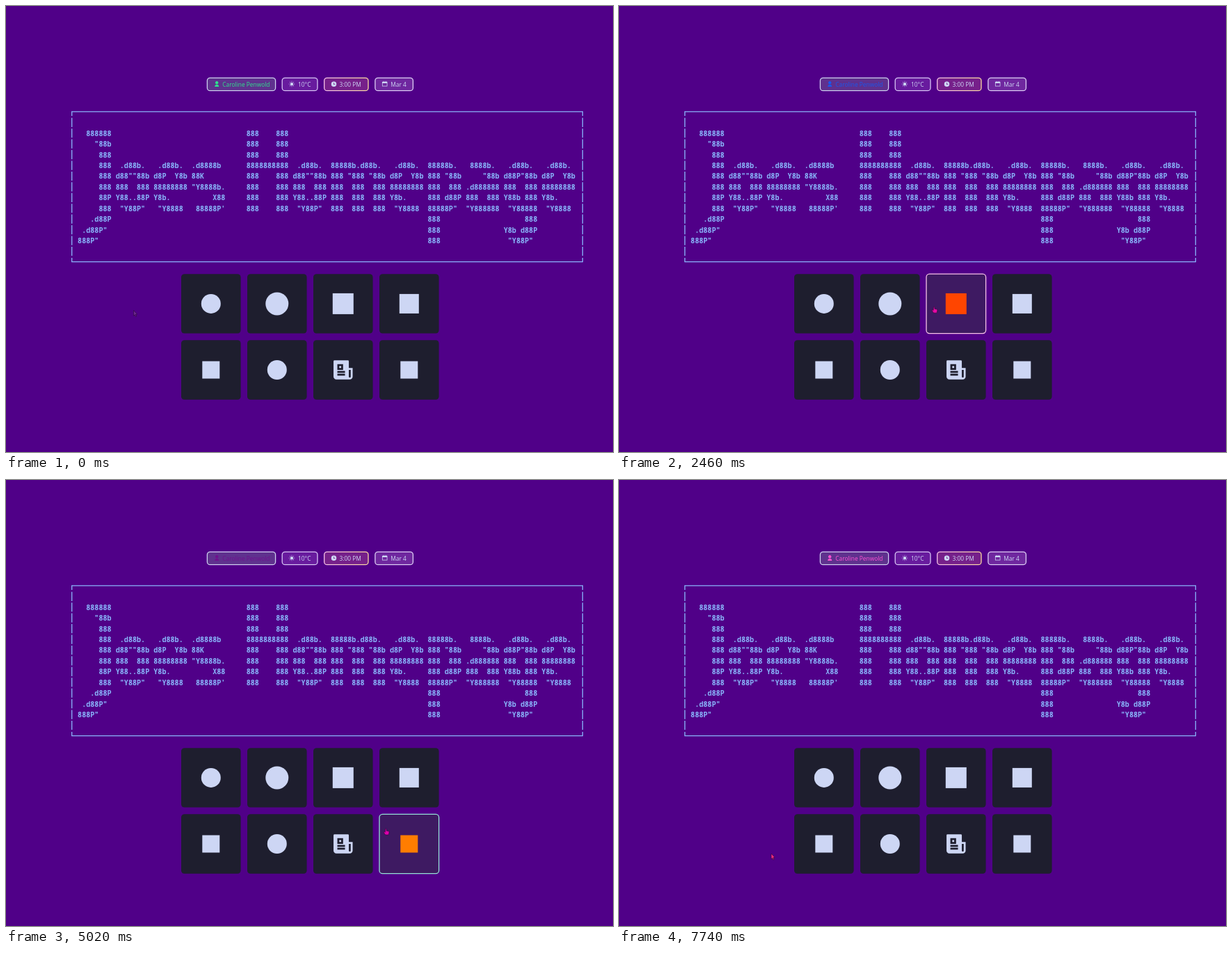
An HTML page for the animation above (7.77 s loop, 873 by 641 pixels).

```html
<!DOCTYPE html>
<html lang="en">
<head>
<meta charset="utf-8">
<title>Start page</title>
<style>
  html, body { margin: 0; width: 100%; height: 100%; overflow: hidden; background: #500088; }
  svg { display: block; width: 873px; height: 641px; }
  .banner { font: 700 10.117px "Noto Sans Mono", "DejaVu Sans Mono", monospace; fill: #89b4fa; white-space: pre; }
  .frame { fill: none; stroke: #89b4fa; stroke-width: 1.3; }
  .badge { font: 8.4px "Open Sans", "Noto Sans", sans-serif; fill: #cdd6f4; }
  .badge rect { stroke-width: 1.3; }
</style>
</head>
<body>
<svg id="stage" viewBox="0 0 873 641">
  <defs>
    <linearGradient id="warm"><stop offset="0" stop-color="#f5c2e7"/><stop offset="1" stop-color="#f9d99f"/></linearGradient>
  </defs>
  <rect width="873" height="641" fill="#500088"/>
</svg>
<script>
const LOOP = 7770;
const stage = document.getElementById('stage');

function add(parent, tag, attrs, text) {
  const el = document.createElementNS('http://www.w3.org/2000/svg', tag);
  for (const key in attrs) el.setAttribute(key, attrs[key]);
  if (text) el.textContent = text;
  parent.appendChild(el);
  return el;
}

// Status badges
const icons = {
  user: 'M4 22a8 8 0 1 1 16 0H4zm8-9c-3.3 0-6-2.7-6-6s2.7-6 6-6 6 2.7 6 6-2.7 6-6 6z',
  sun: 'M12 18a6 6 0 1 1 0-12 6 6 0 0 1 0 12zM11 1h2v3h-2zM11 20h2v3h-2zM3.5 4.9l1.4-1.4L7 5.6 5.6 7zM17 18.4l1.4-1.4 2.1 2.1-1.4 1.4zM19.1 3.5l1.4 1.4L18.4 7 17 5.6zM5.6 17L7 18.4l-2.1 2.1-1.4-1.4zM23 11v2h-3v-2zM4 11v2H1v-2z',
  clock: 'M12 22a10 10 0 1 1 0-20 10 10 0 0 1 0 20zm1-10V7h-2v7h6v-2z',
  date: 'M17 3h4a1 1 0 0 1 1 1v16a1 1 0 0 1-1 1H3a1 1 0 0 1-1-1V4a1 1 0 0 1 1-1h4V1h2v2h6V1h2v2zm3 6H4v10h16V9z',
  news: 'M19 22H5a3 3 0 0 1-3-3V3a1 1 0 0 1 1-1h14a1 1 0 0 1 1 1v7h4v9a3 3 0 0 1-3 3zm-1-10v7a1 1 0 0 0 2 0v-7h-2zM6 6v6h6V6H6zm0 7v2h8v-2H6zm0 3v2h8v-2H6zm2-8h2v2H8V8z'
};

function addIcon(parent, name, x, y, size) {
  return add(parent, 'path', {
    d: icons[name], 'fill-rule': 'evenodd',
    transform: `translate(${x} ${y}) scale(${size / 24})`
  });
}

function addBadge(x, right, icon, textX, text, fill, stroke) {
  const g = add(stage, 'g', { class: 'badge' });
  add(g, 'rect', { x, y: 103.3, width: right - x, height: 18.4, rx: 4, fill, stroke });
  addIcon(g, icon, x + 9.3, 107.7, 9);
  add(g, 'text', { x: textX, y: 116 }, text);
  return g;
}

const nameBadge = addBadge(289.4, 387.6, 'user', 311.3, 'Caroline Penwold', '#5f318e', '#cdd0ee');
addBadge(397.2, 448, 'sun', 420, '10°C', '#681b9e', '#d6c4f4');
addBadge(457.7, 521, 'clock', 479.4, '3:00 PM', '#76208a', 'url(#warm)');
addBadge(530.9, 585.4, 'date', 553.2, 'Mar 4', '#6f279f', '#dccdf4');

// Banner lettering, one entry per glyph; short ones start at row 3
const low = rows => ['', '', '', ...rows];
const glyphs = {
  J: ['  888888', '    "88b', '     888', '     888', '     888', '     888', '     88P', '     888', '   .d88P', ' .d88P"', '888P"'],
  H: [0, 1, 2, 3, 4, 5, 6, 7].map(r => r === 3 ? '8888888888' : '888    888'),
  o: low([' .d88b.', 'd88""88b', '888  888', 'Y88..88P', ' "Y88P"']),
  e: low([' .d88b.', 'd8P  Y8b', '88888888', 'Y8b.', ' "Y8888']),
  s: low(['.d8888b', '88K', '"Y8888b.', '     X88', " 88888P'"]),
  m: low(['88888b.d88b.', '888 "888 "88b', '888  888  888', '888  888  888', '888  888  888']),
  p: low(['88888b.', '888 "88b', '888  888', '888 d88P', '88888P"', '888', '888', '888']),
  a: low([' 8888b.', '    "88b', '.d888888', '888  888', '"Y888888']),
  g: low([' .d88b.', 'd88P"88b', '888  888', 'Y88b 888', ' "Y88888', '     888', 'Y8b d88P', ' "Y88P"'])
};
const word = [['J', 0], ['o', 9], ['e', 18], ['s', 27], ['H', 40], ['o', 51], ['m', 60],
  ['e', 74], ['p', 83], ['a', 92], ['g', 101], ['e', 110]];
const rowH = 15.43;

for (let r = 0; r < 11; r++) {
  let line = '';
  for (const [ch, col] of word) {
    const part = glyphs[ch][r];
    if (part) line = line.padEnd(col) + part;
  }
  add(stage, 'text', { class: 'banner', x: 103.1, y: 186.7 + r * rowH }, line);
}

// Banner frame, its sides broken at each row
let sides = 'M94.7 158V151.9H829.3V158M94.7 362V367.6H829.3V362';
for (let r = 1; r < 14; r++) {
  const y = 151.9 + r * rowH - 6.6;
  sides += `M94.7 ${y}v13.2M829.3 ${y}v13.2`;
}
add(stage, 'path', { class: 'frame', d: sides });

// Link tiles: shape, size, hover border
const tiles = [
  ['circle', 28, '#f5e0dc'], ['circle', 33, '#f2cdcd'], ['square', 30, '#f5c2e7'], ['square', 28, '#cba6f7'],
  ['square', 25, '#f38ba8'], ['circle', 28, '#f38ba8'], ['news', 33, '#fab387'], ['square', 25, '#94e2d5']
].map(([shape, size, border], i) => {
  const x = 252 + (i % 4) * 95, y = i < 4 ? 385.2 : 480.3;
  const cx = x + 42.8, cy = y + 42.7;
  const box = add(stage, 'rect', { x, y, width: 85.6, height: 85.4, rx: 4.5, 'stroke-width': 1.3 });
  let mark;
  if (shape === 'circle') mark = add(stage, 'circle', { cx, cy, r: size / 2 });
  else if (shape === 'square') mark = add(stage, 'rect', { x: cx - size / 2, y: cy - size / 2, width: size, height: size });
  else mark = addIcon(stage, shape, cx - size / 2, cy - size / 2, size);
  return { x, y, box, mark, border };
});

// Pointer, drawn around its centre
const pointer = add(stage, 'path', { stroke: '#2a0838', 'stroke-width': 0.6, 'stroke-linejoin': 'round' });
const ARROW = 'M-2-4.5L3 1 .8 1.2 2 4 .8 4.5-.4 1.7-2 3.2z';
const HAND = 'M-1.6-4.5q1-.6 1.3.5l.3 2.6 2.6.4q1.3.3 1.2 1.6L3.3 3.4q-.3 1-1.3 1h-3Q-2 4.2-2.5 3.2L-4 .6q-.3-1 .7-.9l1.3 1z';

const path = [[0, 185.5, 442], [800, 275, 440], [1600, 364, 439], [2390, 446, 437], [3190, 537, 434], [3350, 567, 433],
  [3650, 586, 445], [4000, 594, 474], [4260, 598, 496], [5130, 540, 507], [5560, 507, 507],
  [6470, 367, 508], [7330, 257, 508], [7740, 221, 541.5]];
const nameColor = [[0, 48, 226, 142], [1600, 30, 168, 248], [3350, 20, 4, 228], [4260, 78, 18, 142],
  [5560, 138, 14, 144], [6470, 212, 16, 196], [7740, 255, 82, 212]];
const markColor = [[0, 255, 69, 0], [4260, 255, 69, 0], [5560, 255, 165, 0], [6470, 255, 238, 0], [7740, 255, 240, 0]];
const pointerColor = [[0, 112, 42, 146], [300, 200, 20, 160], [1600, 255, 20, 165], [3350, 205, 0, 165], [4260, 175, 0, 160],
  [5560, 250, 0, 180], [6470, 250, 0, 180], [7740, 255, 44, 130]];

function at(table, t) {
  let i = 1;
  while (i < table.length - 1 && table[i][0] < t) i++;
  const a = table[i - 1], b = table[i];
  const k = Math.min(1, (t - a[0]) / (b[0] - a[0]));
  return a.slice(1).map((v, n) => v + (b[n + 1] - v) * k);
}
const rgb = (table, t) => `rgb(${at(table, t).map(Math.round)})`;

function draw(now) {
  const t = now % LOOP;
  const [px, py] = at(path, t);
  const hx = px - 2, hy = py - 4;
  let over = false;
  for (const tile of tiles) {
    const hit = hx >= tile.x && hx <= tile.x + 85.6 && hy >= tile.y && hy <= tile.y + 85.4;
    over = over || hit;
    tile.box.setAttribute('fill', hit ? '#3e1a62' : '#1e1e2e');
    tile.box.setAttribute('stroke', hit ? tile.border : 'none');
    tile.mark.setAttribute('fill', hit ? rgb(markColor, t) : '#cdd6f4');
  }
  nameBadge.style.fill = rgb(nameColor, t);
  pointer.setAttribute('d', over ? HAND : ARROW);
  pointer.setAttribute('fill', rgb(pointerColor, t));
  pointer.setAttribute('transform', `translate(${px} ${py})`);
}

const start = performance.now();
function tick() {
  draw(performance.now() - start);
  requestAnimationFrame(tick);
}
tick();
</script>
</body>
</html>
```
